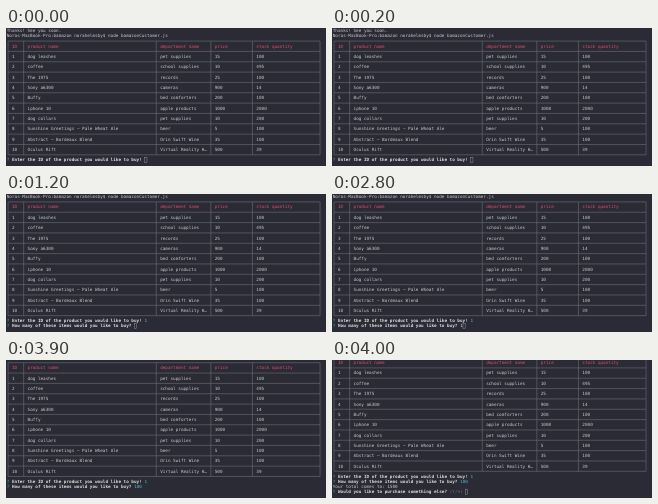
An HTML page for the animation above (8 s loop, 320 px wide and 138 px high).

```html
<!DOCTYPE html>
<html lang="en">
<head>
<meta charset="utf-8">
<title>Store terminal</title>
<style>
  html, body { margin: 0; width: 100%; height: 100%; overflow: hidden; background: #2b2b35; }
  svg { display: block; width: 100%; height: 100%; }
  text {
    font: 4.32px "DejaVu Sans Mono", "Liberation Mono", monospace;
    fill: #c9c9ce; white-space: pre; text-rendering: geometricPrecision;
  }
  .head { fill: #d9506c; }
  .mark { fill: #55b888; }
  .bold { font-weight: bold; fill: #dcdce0; }
  .answer { fill: #58b8ca; }
  .dim { fill: #6e6f79; }
  .rule { fill: none; stroke: #6f6c77; stroke-width: .6; }
  .cursor { fill: none; stroke: #9a9aa2; stroke-width: .45; }
</style>
</head>
<body>
<svg id="stage" viewBox="0 0 320 138"><g id="screen"><g id="table"></g><g id="prompts"></g></g></svg>
<script>
const NS = "http://www.w3.org/2000/svg";
const CELL = 2.6, LINE = 5.17, LEFT = 0.75, TOP = 0.15, LOOP = 8000;
const FIRST_ASK = 25;
const screenEl = document.getElementById("screen");
const tableEl = document.getElementById("table");
const promptsEl = document.getElementById("prompts");

const colX = c => LEFT + c * CELL;
const lineY = l => TOP + l * LINE;

function add(parent, tag, attrs, content) {
  const el = document.createElementNS(NS, tag);
  for (const key in attrs) el.setAttribute(key, attrs[key]);
  if (content) el.textContent = content;
  parent.appendChild(el);
}

function put(parent, col, line, content, cls = "") {
  add(parent, "text", { x: colX(col), y: lineY(line) + 4, class: cls }, content);
}

function cursor(col, line) {
  add(promptsEl, "rect", {
    x: colX(col) + 0.2, y: lineY(line) + 0.2, width: CELL - 0.4, height: LINE - 0.4, class: "cursor"
  });
}

// Table: column borders in character cells, one text line per row plus a rule
const BORDERS = [0, 6, 57, 78, 94, 120];
const ROWS = [
  ["ID", "product name", "department name", "price", "stock quantity"],
  ["1", "dog leashes", "pet supplies", "15", "100"],
  ["2", "coffee", "school supplies", "10", "495"],
  ["3", "The 1975", "records", "25", "100"],
  ["4", "Sony a6300", "cameras", "900", "14"],
  ["5", "Buffy", "bed comforters", "200", "100"],
  ["6", "iphone 10", "apple products", "1000", "2000"],
  ["7", "dog collars", "pet supplies", "10", "200"],
  ["8", "Sunshine Greetings – Pale Wheat Ale", "beer", "5", "100"],
  ["9", "Abstract – Bordeaux Blend", "Orin Swift Wine", "35", "100"],
  ["10", "Oculus Rift", "Virtual Reality H…", "500", "39"]
];

function drawTable() {
  put(tableEl, 0, 0, "Thanks! See you soon.");
  put(tableEl, 0, 1, "Noras-MacBook-Pro:bamazon norahelmsby$ node bamazonCustomer.js");
  const xs = BORDERS.map(b => colX(b + 0.5));
  const top = lineY(2.5), bottom = lineY(2.5 + ROWS.length * 2);
  let path = xs.map(x => `M${x} ${top}V${bottom}`).join("");
  for (let i = 0; i <= ROWS.length; i++) path += `M${xs[0]} ${lineY(2.5 + i * 2)}H${xs[5]}`;
  add(tableEl, "path", { d: path, class: "rule" });
  ROWS.forEach((row, i) => row.forEach((cell, j) =>
    put(tableEl, BORDERS[j] + 2, 3 + i * 2, cell, i ? "" : "head")));
}

const ASK_ID = "Enter the ID of the product you would like to buy!";
const ASK_COUNT = "How many of these items would you like to buy?";
const ASK_MORE = "Would you like to purchase something else?";

// Draws a question and returns the column after it
function ask(line, question) {
  put(promptsEl, 0, line, "?", "mark");
  put(promptsEl, 2, line, question, "bold");
  return question.length + 3;
}

function typing(line, question, typed) {
  const col = ask(line, question);
  if (typed) put(promptsEl, col, line, typed);
  cursor(col + typed.length, line);
}

function answered(line, question, reply) {
  put(promptsEl, ask(line, question), line, reply, "answer");
}

const STEPS = [
  { at: 0, scroll: 0, id: "" },
  { at: 500, scroll: 0, id: "1" },
  { at: 1200, scroll: 1, id: "1", count: "" },
  { at: 2800, scroll: 1, id: "1", count: "1" },
  { at: 3000, scroll: 1, id: "1", count: "10" },
  { at: 3200, scroll: 1, id: "1", count: "100" },
  { at: 3900, scroll: 2, id: "1", count: "100" },
  { at: 4000, scroll: 3, id: "1", count: "100" }
];

function show(step) {
  promptsEl.textContent = "";
  screenEl.setAttribute("transform", `translate(0 ${-step.scroll * LINE})`);
  (step.scroll > 0 ? answered : typing)(FIRST_ASK, ASK_ID, step.id);
  if (step.scroll > 0) {
    (step.scroll > 1 ? answered : typing)(FIRST_ASK + 1, ASK_COUNT, step.count);
  }
  if (step.scroll > 2) {
    put(promptsEl, 0, FIRST_ASK + 2, "Your total comes to: 1500");
    const col = ask(FIRST_ASK + 3, ASK_MORE);
    put(promptsEl, col, FIRST_ASK + 3, "(Y/n)", "dim");
    cursor(col + 6, FIRST_ASK + 3);
  }
}

let current = null;
function tick() {
  const t = performance.now() % LOOP;
  const step = STEPS.filter(s => s.at <= t).pop();
  if (step !== current) show(current = step);
  requestAnimationFrame(tick);
}

drawTable();
tick();
</script>
</body>
</html>
```
